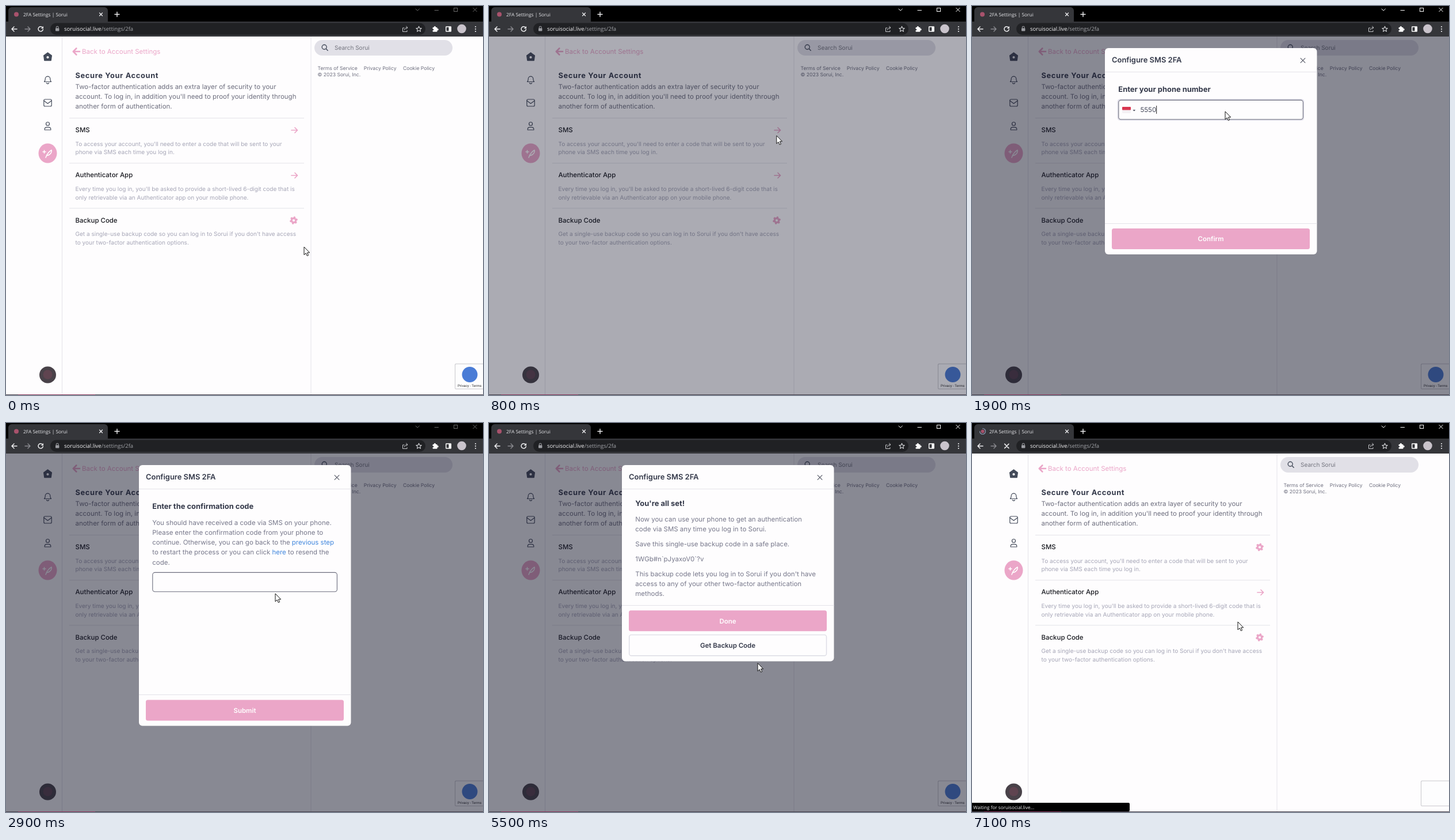
Recreate the animation shown at these times as an HTML page. Size 829x675 px, loop 7200 ms.

```html
<!DOCTYPE html>
<html lang="en">
<head>
<meta charset="utf-8">
<title>2FA Settings</title>
<style>
html, body { margin: 0; width: 100%; height: 100%; overflow: hidden; background: #fefdfe; }
svg { display: block; width: 829px; height: 675px; font-family: Inter, sans-serif; }
.ui { font-family: "Open Sans", "Noto Sans", sans-serif; }
.line { fill: none; stroke-linecap: round; stroke-linejoin: round; }
</style>
</head>
<body>
<svg id="stage" viewBox="0 0 829 675" xmlns="http://www.w3.org/2000/svg" text-rendering="geometricPrecision"></svg>
<script>
const LOOP = 7200, STEP = 100;
const BRAND = 'Sorui', HOST = 'soruisocial.live';
const PHONE = '5550 0142', CODE = '056038';
const PINK = '#eba6c8', HOVER = '#e29dc0', INK = '#333849', BODY = '#6d6e7e', FAINT = '#a6a6b7', RULE = '#e4e3e9';
const MAIN = 11.48, SMALL = 10.06, TITLE = 12.95;

const esc = s => s.replace(/&/g, '&amp;').replace(/</g, '&lt;');
const text = (x, y, s, size, fill, weight = 400, extra = '') =>
  `<text x="${x}" y="${y}" font-size="${size}" font-weight="${weight}" fill="${fill}" ${extra}>${esc(s)}</text>`;
const lines = (x, ys, rows, size, fill) => rows.map((s, i) => text(x, ys[i], s, size, fill)).join('');
const rect = (x, y, w, h, fill, r = 0, extra = '') =>
  `<rect x="${x}" y="${y}" width="${w}" height="${h}" rx="${r}" fill="${fill}" ${extra}/>`;
const disc = (x, y, r, fill, extra = '') => `<circle cx="${x}" cy="${y}" r="${r}" fill="${fill}" ${extra}/>`;
const path = (d, stroke, w = 1.2, extra = '') =>
  `<path class="line" d="${d}" stroke="${stroke}" stroke-width="${w}" ${extra}/>`;
const group = (id, body) => `<g id="${id}">${body}</g>`;
const cross = (x, y, r, stroke, w) =>
  path(`M${x - r} ${y - r}l${2 * r} ${2 * r}m0 ${-2 * r}l${-2 * r} ${2 * r}`, stroke, w);
const arrow = (x, y) => path(`M${x - 5} ${y}h10.5m-4.5 -4.5l4.5 4.5l-4.5 4.5`, PINK, 1.7);

function gear(x, y) {
  const pts = [];
  for (let i = 0; i < 24; i++) {
    const a = (i + .5) * Math.PI / 12, r = i % 4 < 2 ? 6.5 : 4.7;
    pts.push((x + r * Math.sin(a)).toFixed(1) + ',' + (y - r * Math.cos(a)).toFixed(1));
  }
  return `<polygon points="${pts.join(' ')}" fill="${PINK}" stroke="${PINK}" stroke-linejoin="round"/>` + disc(x, y, 2.1, '#fefdfe');
}

function browser() {
  const white = '#f1f1f3', gray = '#9c9da2';
  return rect(0, 0, 829, 28, '#000') +
    rect(4, 2, 173, 32, '#35363a', 6) + rect(0, 27, 829, 26, '#35363a') +
    group('favicon', disc(18, 14.5, 4, '#a8526c')) +
    group('spinner', disc(18.5, 14.5, 3, '#a8526c') + path('M18.5 9.5a5 5 0 1 1 -5 5', '#8d9bb5', 1.2, 'id="arc"')) +
    text(30, 17.6, `2FA Settings | ${BRAND}`, 8.4, '#e4e5e8', 400, 'class="ui"') +
    cross(165, 14.5, 2.5, white, 1.2) + path('M189 14.5h8m-4 -4v8', white, 1.4) +
    group('controls', path('M712 5l3.2 3.2l3.2 -3.2M745 7.5h6.5', '#fff', 1) +
      rect(778.5, 3.5, 6, 6, 'none', 0, 'stroke="#fff"') + cross(815, 6.5, 3.2, '#fff', 1)) +
    path('M19 40h-9m4 -4l-4 4l4 4', white, 1.5) + path('M33 40h9m-4 -4l4 4l-4 4', '#8a8b90', 1.4) +
    group('reload', path('M63.3 37a4.2 4.2 0 1 0 1 3.8', white, 1.5) + `<path d="M65 35v4.3h-4.3z" fill="${white}"/>`) +
    group('stop', cross(60.3, 40, 3.6, white, 1.5)) +
    rect(77, 29.5, 652, 20.5, '#202124', 10.2) +
    rect(86, 38.6, 6.4, 5, gray, .8) + path('M87.3 38.6v-1.4a1.9 1.9 0 0 1 3.8 0v1.4', gray, 1.1) +
    `<text class="ui" x="101" y="43.2" font-size="9.5" fill="${white}">${HOST}<tspan fill="#a2a4a9">/settings/2fa</tspan></text>` +
    path('M692 38h-2.5v6.5h7.5v-2M692.5 41.5c.5 -3 2.5 -4 5 -4m-2 -2.3l2.6 2.3l-2.6 2.3', '#c6c7ca', 1) +
    path('M717.5 35.3l1.4 3.1l3.4 .3l-2.6 2.2l.8 3.3l-3 -1.8l-3 1.8l.8 -3.3l-2.6 -2.2l3.4 -.3z', '#d4d5d8', 1.1) +
    rect(741.5, 37, 8, 7.7, '#fff', 1) + disc(745.3, 36.6, 1.7, '#fff') + disc(750, 40.8, 1.7, '#fff') + disc(742, 41, 1.3, '#35363a') +
    rect(764.7, 36, 8.6, 8, 'none', .6, 'stroke="#fff" stroke-width="1.4"') + rect(769.5, 36, 4, 8, '#fff') +
    disc(792, 39.5, 7.8, '#c9c3cb') +
    [36, 40, 44].map(y => disc(816, y, 1.1, white)).join('');
}

function sidebar() {
  const ink = '#444b5a';
  return rect(97, 53, 1, 621, RULE) + rect(529.5, 53, 1, 621, RULE) +
    `<path d="M72.5 81l6.8 5l-1.2 8.5h-11.2l-1.2 -8.5z" fill="${ink}" stroke="${ink}" stroke-width="1.5" stroke-linejoin="round"/>` +
    disc(72.5, 89, 2.1, '#fefdfe') +
    path('M66.5 131.5c1.5 -1.5 1.7 -2.5 1.7 -5a4.3 4.3 0 0 1 8.6 0c0 2.5 .2 3.5 1.7 5zM70.5 133.5a2.1 2.1 0 0 0 4 0', ink, 1.2) +
    rect(65.8, 162, 13.4, 12, 'none', 2, `stroke="${ink}" stroke-width="1.2"`) + path('M66 164.5l6.5 4.8l6.5 -4.8', ink, 1.2) +
    disc(72.5, 204.5, 3, 'none', `stroke="${ink}" stroke-width="1.2"`) +
    path('M67.2 215v-1.5a3.5 3.5 0 0 1 3.5 -3.2h3.6a3.5 3.5 0 0 1 3.5 3.2v1.5z', ink, 1.2) +
    `<ellipse cx="72.5" cy="255.5" rx="16" ry="17" fill="${PINK}"/>` +
    path('M69 263c2 -6 5 -10 10 -13c1 4 -2 8 -7 9.5M64 253h5m-2.5 -2.5v5', '#fff', 1.5) +
    disc(72.5, 640, 14.5, '#494249') + disc(72.5, 639.5, 8, '#5f4450');
}

function page() {
  const item = (y, title, rows) => rect(110, y, 408, 1, RULE) +
    text(120.5, y + 25, title, 11.44, '#191a20', 500) +
    lines(120.5, [y + 48.8, y + 63.2], rows, SMALL, FAINT);
  return rect(0, 53, 829, 622, '#fefdfe') + sidebar() +
    path('M128 79h-10.5m4.8 -5.5l-5.5 5.5l5.5 5.5', PINK, 2.6) +
    text(132, 83.2, 'Back to Account Settings', MAIN, PINK) +
    text(120.5, 124.8, 'Secure Your Account', 12.87, INK, 700, 'letter-spacing=".64"') +
    lines(120.5, [143.8, 161, 178.1], [
      'Two-factor authentication adds an extra layer of security to your',
      "account. To log in, in addition you'll need to proof your identity through",
      'another form of authentication.'], MAIN, BODY) +
    item(194, 'SMS', ["To access your account, you'll need to enter a code that will be sent to your",
      'phone via SMS each time you log in.']) +
    item(272.3, 'Authenticator App', ["Every time you log in, you'll be asked to provide a short-lived 6-digit code that is",
      'only retrievable via an Authenticator app on your mobile phone.']) +
    item(350.5, 'Backup Code', [`Get a single-use backup code so you can log in to ${BRAND} if you don't have access`,
      'to your two-factor authentication options.']) +
    group('smsArrow', arrow(501, 215.5)) + group('smsGear', gear(500, 215.5)) +
    arrow(501, 294) + gear(500, 372) +
    rect(536, 59, 240, 27, '#e1e0e7', 13.5) +
    disc(553.2, 71.2, 4, 'none', 'stroke="#444b5a" stroke-width="1.4"') + path('M556.2 74.2l3 3', '#444b5a', 1.5) +
    text(571, 75.9, `Search ${BRAND}`, SMALL, '#74757f') +
    text(541.5, 110.7, 'Terms of Service', 8.6, BODY) + text(621.7, 110.7, 'Privacy Policy', 8.6, BODY) +
    text(690, 110.7, 'Cookie Policy', 8.6, BODY) + text(541.5, 122.2, `© 2023 ${BRAND}, Inc.`, 8.6, BODY) +
    rect(780, 620.5, 52, 44.5, '#c9c8cd', 2) + rect(781, 621.5, 50, 42.5, '#fdfdfe', 1.5) +
    group('badge', disc(806, 639.5, 13.5, '#4a7cd6') +
      text(785, 660.7, 'Privacy - Terms', 6.1, '#333', 400, 'font-family="Roboto, sans-serif"'));
}

function modal() {
  const X = 254.3, MUTED = '#77788b';
  const panel = bottom => rect(231, 73, 368.5, bottom - 73, '#fefdfe', 6) +
    text(243, 98.3, 'Configure SMS 2FA', TITLE, INK, 600) + cross(575, 94.5, 3.9, '#555866', 1.1) +
    rect(231, 114, 368.5, 1, RULE);
  const title = (y, s) => text(X, y, s, TITLE, INK, 700);
  const button = (id, y, s) => rect(243, y, 344, 36, PINK, 3.5, `id="${id}"`) +
    text(415, y + 22.2, s, MAIN, '#fff', 600, 'text-anchor="middle"');
  const input = (id, y, x) => rect(252.5, y - 2, 325, 38, '#e3e2ec', 5.5, `id="${id}Ring"`) +
    rect(254.8, y + .4, 320.6, 33.4, '#fefdfe', 4, 'stroke="#6c6d7d" stroke-width="1.1"') +
    text(x, y + 21.3, '', MAIN, '#44485a', 400, `id="${id}Text"`) +
    rect(x, y + 10, 1, 14, '#222', 0, `id="${id}Caret"`);
  const link = s => `<tspan fill="#3f86dd">${s}</tspan>`;
  const para = (y, html) => `<text x="${X}" y="${y}" font-size="${MAIN}" fill="${MUTED}">${html}</text>`;

  return group('step0', panel(431) + title(149, 'Enter your phone number') + input('phone', 163, 292.5) +
      rect(261, 175, 15, 11, '#f4f1f4', 1) + rect(261, 175, 15, 5.5, '#d8354f', 1) +
      '<path d="M279.5 180h4.6l-2.3 2.8z" fill="#555866"/>' +
      rect(231, 377, 368.5, 1, RULE) + button('confirm', 386, 'Confirm')) +
    group('step1', panel(525.5) + title(149.3, 'Enter the confirmation code') +
      para(176.7, 'You should have received a code via SMS on your phone.') +
      para(193.9, 'Please enter the confirmation code from your phone to') +
      para(211.1, 'continue. Otherwise, you can go back to the ' + link('previous step')) +
      para(228.3, 'to restart the process or you can click ' + link('here') + ' to resend the') +
      para(245.5, 'code.') + input('code', 259, 266.7) +
      rect(231, 471, 368.5, 1, RULE) + button('submit', 480.5, 'Submit')) +
    group('step2', panel(413.5) + title(143.6, "You're all set!") +
      lines(X, [171, 188.2, 214, 239.8, 265.6, 282.8, 300], [
        'Now you can use your phone to get an authentication',
        `code via SMS any time you log in to ${BRAND}.`,
        'Save this single-use backup code in a safe place.',
        '1WGb#n`pJyaxoV0`?v',
        `This backup code lets you log in to ${BRAND} if you don't have`,
        'access to any of your other two-factor authentication',
        'methods.'], MAIN, MUTED) +
      rect(231, 316, 368.5, 1, RULE) + button('done', 325.3, 'Done') +
      rect(243.7, 367.6, 342.8, 36.2, '#fefdfe', 3.5, 'stroke="#dddde5" stroke-width="1.4"') +
      text(415, 389.8, 'Get Backup Code', MAIN, INK, 600, 'text-anchor="middle"'));
}

const pointers =
  group('pointer', '<path d="M0 0v13.8l3.2 -2.9l2.1 4.7l2.3 -1l-2.1 -4.6h4.2z" fill="#fff" stroke="#111"/>') +
  group('hand', '<path d="M0 1.2a1.3 1.3 0 0 1 2.6 0v4.6l.3 -.9a1.2 1.2 0 0 1 2.2 .5a1.2 1.2 0 0 1 2.2 .5a1.1 1.1 0 0 1 1.9 .8v3.6l-1.4 4.7h-6.3l-4.3 -5.4a1.2 1.2 0 0 1 1.9 -1.5l.9 .9z" fill="#fff" stroke="#111"/>');

document.getElementById('stage').innerHTML = page() +
  rect(0, 53, 829, 622, '#14172b', 0, 'id="shade"') + group('modal', modal()) + browser() +
  rect(0, 674, 829, 1, '#47414d') + rect(21, 674, 134, 1, '#86365c') +
  group('status', rect(-4, 659, 278, 15, '#000', 2) +
    text(2, 669.8, `Waiting for ${HOST}...`, 8.2, '#f1f1f3', 400, 'class="ui"')) + pointers;

const ui = {};
document.querySelectorAll('[id]').forEach(n => ui[n.id] = n);
const show = (id, on) => ui[id].style.display = on ? '' : 'none';
const ramp = (t, a, b) => Math.min(1, Math.max(0, (t - a) / (b - a)));
const within = (t, a, b) => t >= a && t < b;

// time, x, y of the pointer tip
const route = [[100, 518, 418], [500, 501, 215], [700, 501, 215], [1200, 489.5, 311], [1500, 440, 183], [2100, 440, 183],
  [2400, 468, 402], [2600, 468, 402], [2900, 468, 296], [3400, 440, 276], [4200, 440, 276], [4700, 468.5, 489],
  [5200, 468.5, 489], [5800, 465.5, 344.5], [6500, 465.5, 344.5], [6700, 462, 345], [7200, 462, 345]];

function pointerAt(t) {
  const i = route.findIndex(p => p[0] >= t);
  if (i < 1) return route[0].slice(1);
  const [a, x, y] = route[i - 1], [b, u, v] = route[i];
  let k = ramp(t, a, b);
  k = k * k * (3 - 2 * k);
  return [x + (u - x) * k, y + (v - y) * k];
}

function typeInto(id, value, n, hint, focused) {
  const label = ui[id + 'Text'], typed = value.slice(0, n);
  label.textContent = typed;
  const width = typed ? label.getComputedTextLength() : 0;
  ui[id + 'Caret'].setAttribute('x', +label.getAttribute('x') + width);
  if (!typed) label.textContent = hint;
  label.setAttribute('fill', typed ? '#44485a' : '#8d8e9c');
  show(id + 'Caret', focused);
  show(id + 'Ring', focused);
}

function render(t) {
  const closing = 1 - ramp(t, 6500, 6800);
  const shade = ramp(t, 450, 1000) * closing, fade = ramp(t, 1010, 1510) * closing;
  const step = t < 2600 ? 0 : t < 5300 ? 1 : 2;
  const loading = t >= 6800;

  // the backdrop eases back a little once the dialog is open
  ui.shade.setAttribute('opacity', shade * (.56 - .06 * ramp(t, 1300, 1600)));
  ui.modal.setAttribute('opacity', fade);
  ui.modal.setAttribute('transform', `translate(0 ${-19.5 * (1 - fade)})`);
  [0, 1, 2].forEach(i => show('step' + i, i === step));

  typeInto('phone', PHONE, Math.floor(ramp(t, 1600, 2200) * 9), PHONE, within(t, 1500, 2400));
  typeInto('code', CODE, Math.floor(ramp(t, 3700, 4300) * 6), '', within(t, 3500, 5200));

  const [x, y] = pointerAt(t);
  let over = t < 450 && Math.abs(x - 501) < 7 && Math.abs(y - 215) < 7;
  [['confirm', 386], ['submit', 480.5], ['done', 325.3]].forEach(([id, top], i) => {
    const hot = i === step && fade === 1 && x > 243 && x < 587 && y > top && y < top + 36;
    ui[id].setAttribute('fill', hot ? HOVER : PINK);
    over = over || hot;
  });
  show('hand', over);
  show('pointer', !over);
  ui[over ? 'hand' : 'pointer'].setAttribute('transform', `translate(${x} ${y})`);

  ui.controls.setAttribute('opacity', t < 300 || within(t, 2400, 3700) ? .4 : 1);
  ['spinner', 'stop', 'status', 'smsGear'].forEach(id => show(id, loading));
  ['favicon', 'reload', 'smsArrow', 'badge'].forEach(id => show(id, !loading));
  ui.arc.setAttribute('transform', `rotate(${(t - 7100) * .36} 18.5 14.5)`);
}

function tick() {
  const t = performance.now() % LOOP;
  render(Math.floor(t / STEP) * STEP);
  requestAnimationFrame(tick);
}
tick();
</script>
</body>
</html>
```
